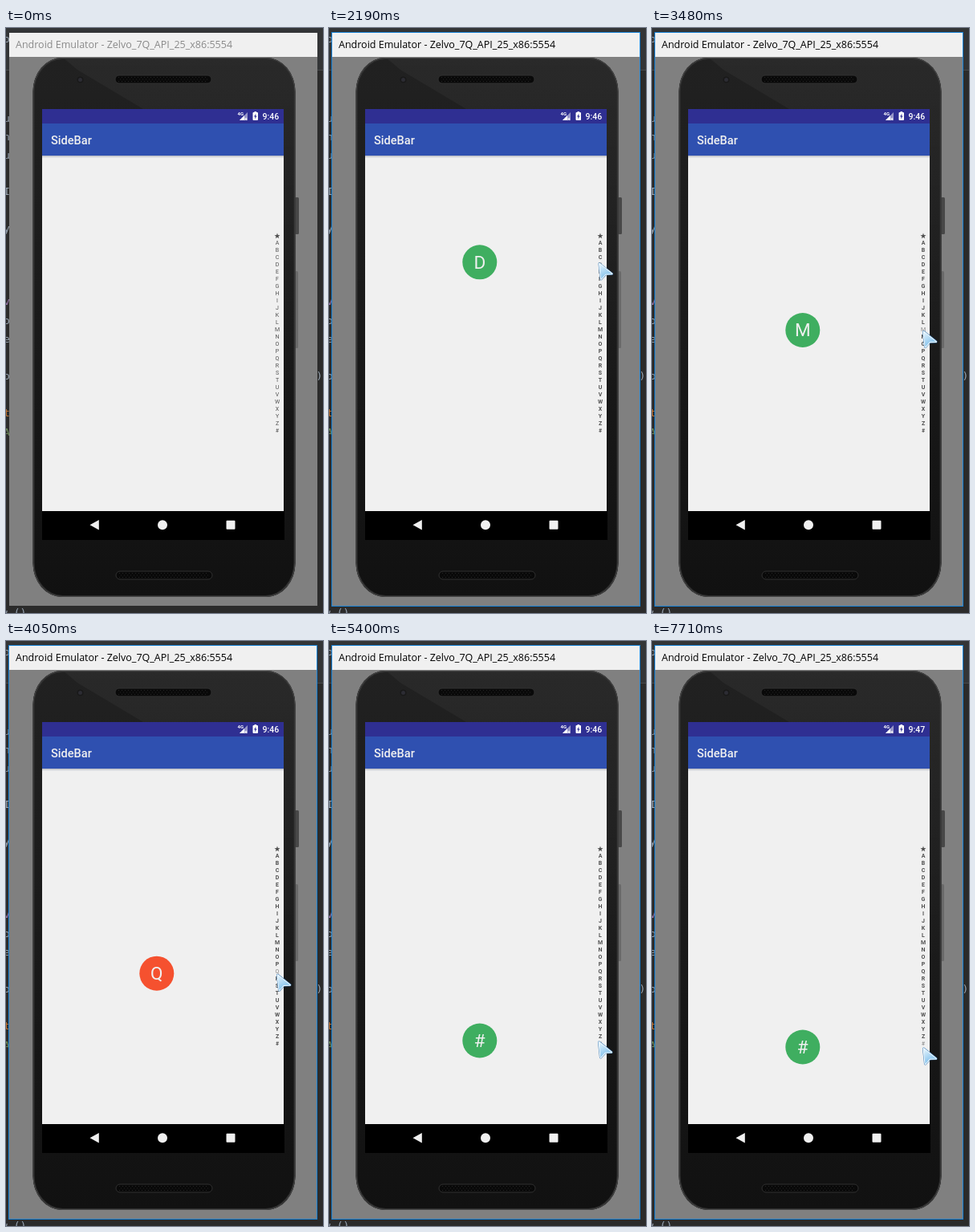
These frames come from a looping animation (395x729 px, 8000 ms). An HTML page with a canvas:

```html
<!DOCTYPE html>
<html lang="en">
<head>
<meta charset="utf-8">
<title>SideBar</title>
<style>
  html, body { margin: 0; width: 100%; height: 100%; overflow: hidden; background: #2b2b2b; }
  canvas { display: block; }
</style>
</head>
<body>
<canvas id="stage" width="395" height="729"></canvas>
<script>
const ctx = document.getElementById('stage').getContext('2d');
const LOOP = 8000, STEP = 30;
const WAKE = 840, PRESS = 1020, RELEASE = 5940, LEAVE = 6960, RETURN = 7200, TICK = 7500, PRESS_AGAIN = 7710;
const ROWS = [...'★ABCDEFGHIJKLMNOPQRSTUVWXYZ#'];
const ROW_H = 9, ROW_TOP = 254.5, ROW_X = 338;
const COLORS = ['#f5512f', '#f2b02f', '#3fae60'];
const LIGHT = '#f0f0f0';

// Pointer stops: time, x, y
const PATH = [
  [30, 386, 347], [180, 386, 347], [630, 335, 258], [1590, 335, 258],
  [2370, 337, 302], [2760, 338, 328], [3180, 338, 355], [3480, 338, 376.5],
  [3990, 338, 410.5], [4650, 338, 451], [4800, 337, 463], [5400, 336, 498],
  [5610, 335, 514], [5940, 337, 562], [RETURN, 390, 571], [7680, 338, 506]
];

function pointerAt(t) {
  const i = PATH.findIndex(p => p[0] > t);
  if (i < 0) return PATH[PATH.length - 1].slice(1);
  if (i === 0) return PATH[0].slice(1);
  const [t0, x0, y0] = PATH[i - 1], [t1, x1, y1] = PATH[i];
  const k = (t - t0) / (t1 - t0);
  return [x0 + (x1 - x0) * k, y0 + (y1 - y0) * k];
}

function rect(x, y, w, h, color) {
  ctx.fillStyle = color;
  ctx.fillRect(x, y, w, h);
}

function round(x, y, w, h, r, fill, stroke) {
  ctx.beginPath();
  ctx.roundRect(x, y, w, h, r);
  if (fill) { ctx.fillStyle = fill; ctx.fill(); }
  if (stroke) { ctx.strokeStyle = stroke; ctx.stroke(); }
}

function poly(points, color) {
  ctx.beginPath();
  points.forEach(([x, y]) => ctx.lineTo(x, y));
  ctx.closePath();
  ctx.fillStyle = color;
  ctx.fill();
}

function disc(x, y, r, color) {
  ctx.beginPath();
  ctx.arc(x, y, r, 0, 7);
  ctx.fillStyle = color;
  ctx.fill();
}

function text(s, x, y, font, color, align = 'left') {
  ctx.font = font;
  ctx.textAlign = align;
  ctx.fillStyle = color;
  ctx.fillText(s, x, y);
}

function star(x, y, r, color) {
  poly(Array.from({ length: 10 }, (_, i) => {
    const a = i * Math.PI / 5, d = i % 2 ? r * 0.4 : r;
    return [x + d * Math.sin(a), y - d * Math.cos(a)];
  }), color);
}

function fade(x0, y0, x1, y1, ...stops) {
  const g = ctx.createLinearGradient(x0, y0, x1, y1);
  stops.forEach(([at, color]) => g.addColorStop(at, color));
  return g;
}

function drawEditor() {
  rect(0, 0, 395, 729, '#2b2b2b');
  rect(0, 0, 395, 52, '#333537');
  rect(0, 52, 395, 1, '#47494b');
  const font = '13px "DejaVu Sans Mono", monospace', gray = '#98a4b1';
  const code = [['o', 18], ['u', 117], ['n', 140], ['u', 163], ['I', 208], ['y', 254],
    ['v', 345, '#9876aa'], ['o', 369], ['e', 392], ['o', 438], ['t', 484, '#cc7832'], ['A', 508, '#6a8759']];
  code.forEach(([s, y, color = gray]) => text(s, -3, y, font, color));
  text(')', 386.5, 438, font, gray);
  text('w.()', -6, 733, font, gray);
}

function drawWindow(active) {
  rect(4, 6, 384, 714, '#808080');
  rect(4, 6, 384, 30, LIGHT);
  if (active) {
    ctx.strokeStyle = '#1883d7';
    ctx.strokeRect(3.5, 5.5, 384, 715);
  }
  text('Android Emulator - Zelvo_7Q_API_25_x86:5554', 12, 25,
    '12.5px "Open Sans", sans-serif', active ? '#000' : '#8a8a8a');
}

function drawGrille(x, y) {
  round(x, y, 120, 10, 5, '#090909', '#303030');
  ctx.fillStyle = '#252525';
  for (let r = 0; r < 3; r++)
    for (let c = 0; c < 28; c++) ctx.fillRect(x + 4 + c * 4 + r % 2 * 2, y + 2 + r * 2.5, 1, 1);
}

function drawPhone() {
  round(360, 211, 5, 46, 1.5, '#484848');
  round(360, 303, 4, 96, 1.5, '#6a6a6a');
  const body = fade(0, 37, 0, 709, [0, '#212121'], [0.5, '#1a1a1a'], [1, '#111']);
  const corner = { x: 36, y: 42 };
  round(33.5, 37, 327, 672, corner, body);
  ctx.save();
  ctx.clip();
  poly([[70, 36], [89, 52], [166, 98], [346, 205], [346, 450], [361, 459], [361, 36]],
    fade(0, 37, 0, 459, [0, '#ffffff0a'], [1, '#ffffff00']));
  ctx.restore();
  ctx.lineWidth = 2;
  round(34.5, 38, 325, 670, corner, null, '#2d2d2d');
  ctx.lineWidth = 1;
  round(34, 37.5, 326, 671, corner, null, '#454545');
  disc(92.5, 64.5, 4, '#191919');
  disc(92.5, 64.5, 2.5, '#2c2c33');
  drawGrille(136, 59);
  drawGrille(137, 677);
}

function drawStatus(clock) {
  rect(45, 101, 301, 18, '#2f2f92');
  text('4G', 288.5, 109, 'bold 6px Roboto, sans-serif', '#fff');
  poly([[291, 115], [301, 105], [301, 115]], '#9797c8');
  poly([[291, 115], [297, 109], [297, 115]], '#fff');
  text('×', 297, 116, 'bold 7px Roboto, sans-serif', '#fff');
  round(307.5, 105, 6.5, 10, 1, '#fff');
  rect(309.5, 104, 2.5, 1, '#fff');
  poly([[311.5, 106.5], [309, 110.5], [310.5, 110.5], [310, 113.5], [312.7, 109.5], [311, 109.5]], '#2f2f92');
  text(clock, 319.5, 114, '500 10.5px Roboto, sans-serif', '#fff');
}

function drawScreen(clock) {
  rect(45, 101, 301, 537, LIGHT);
  drawStatus(clock);
  rect(45, 119, 301, 40, '#2f50b0');
  rect(45, 159, 301, 3, fade(0, 159, 0, 162, [0, '#b5b8c0'], [1, LIGHT]));
  text('SideBar', 56, 144.5, '500 14.6px Roboto, sans-serif', LIGHT);
  rect(45, 602, 302, 36, '#000');
  poly([[104.5, 619.2], [115.8, 613], [115.8, 625.4]], LIGHT);
  disc(195, 619.2, 6, LIGHT);
  round(274.5, 613.7, 11, 11, 1, LIGHT);
}

function drawIndex(picked) {
  const held = picked >= 0;
  ROWS.forEach((s, i) => {
    const y = ROW_TOP + (i + 0.5) * ROW_H;
    const lit = i === picked;
    const color = lit ? '#858585' : '#505050';
    if (i === 0) star(ROW_X, y + 0.3, 3.7, color);
    else text(s, ROW_X, y + 2.4, `${held && !lit ? 'bold ' : ''}7px Roboto, sans-serif`, color, 'center');
  });
}

function drawBubble(row, y) {
  const s = ROWS[row];
  disc(187.8, y, 21.5, COLORS[s.charCodeAt(0) % 3]);
  if (row === 0) star(187.8, y + 0.5, 11.3, LIGHT);
  else text(s, 187.8, y + 7.8, '22.5px Roboto, sans-serif', LIGHT, 'center');
}

function drawPointer(x, y) {
  ctx.save();
  ctx.translate(x - 0.5, y + 1);
  ctx.lineJoin = 'round';
  ctx.beginPath();
  [[1, 1], [16.5, 13.5], [8.5, 13.8], [3, 20]].forEach(p => ctx.lineTo(...p));
  ctx.closePath();
  ctx.lineWidth = 3;
  ctx.strokeStyle = '#3f7fb8';
  ctx.stroke();
  ctx.translate(-0.6, -0.6);
  ctx.lineWidth = 2;
  ctx.strokeStyle = '#f4fbff';
  ctx.stroke();
  ctx.fillStyle = fade(2, 2, 10, 18, [0, '#e4f4fd'], [1, '#85c2ec']);
  ctx.fill();
  ctx.restore();
}

function draw(t) {
  const [x, y] = pointerAt(t);
  const held = t >= PRESS && t < RELEASE || t >= PRESS_AGAIN;
  const row = Math.max(0, Math.min(ROWS.length - 1, Math.floor((y - ROW_TOP) / ROW_H)));
  const shown = t >= 30 && t < LEAVE || t >= RETURN;
  ctx.lineWidth = 1;
  drawEditor();
  drawWindow(t >= WAKE);
  drawPhone();
  drawScreen(t < TICK ? '9:46' : '9:47');
  drawIndex(held ? row : -1);
  if (held) drawBubble(row, y);
  if (shown) drawPointer(x, y);
}

const start = performance.now();
function tick() {
  const t = (performance.now() - start) % LOOP;
  draw(Math.floor(t / STEP) * STEP);
  requestAnimationFrame(tick);
}
tick();
</script>
</body>
</html>
```
